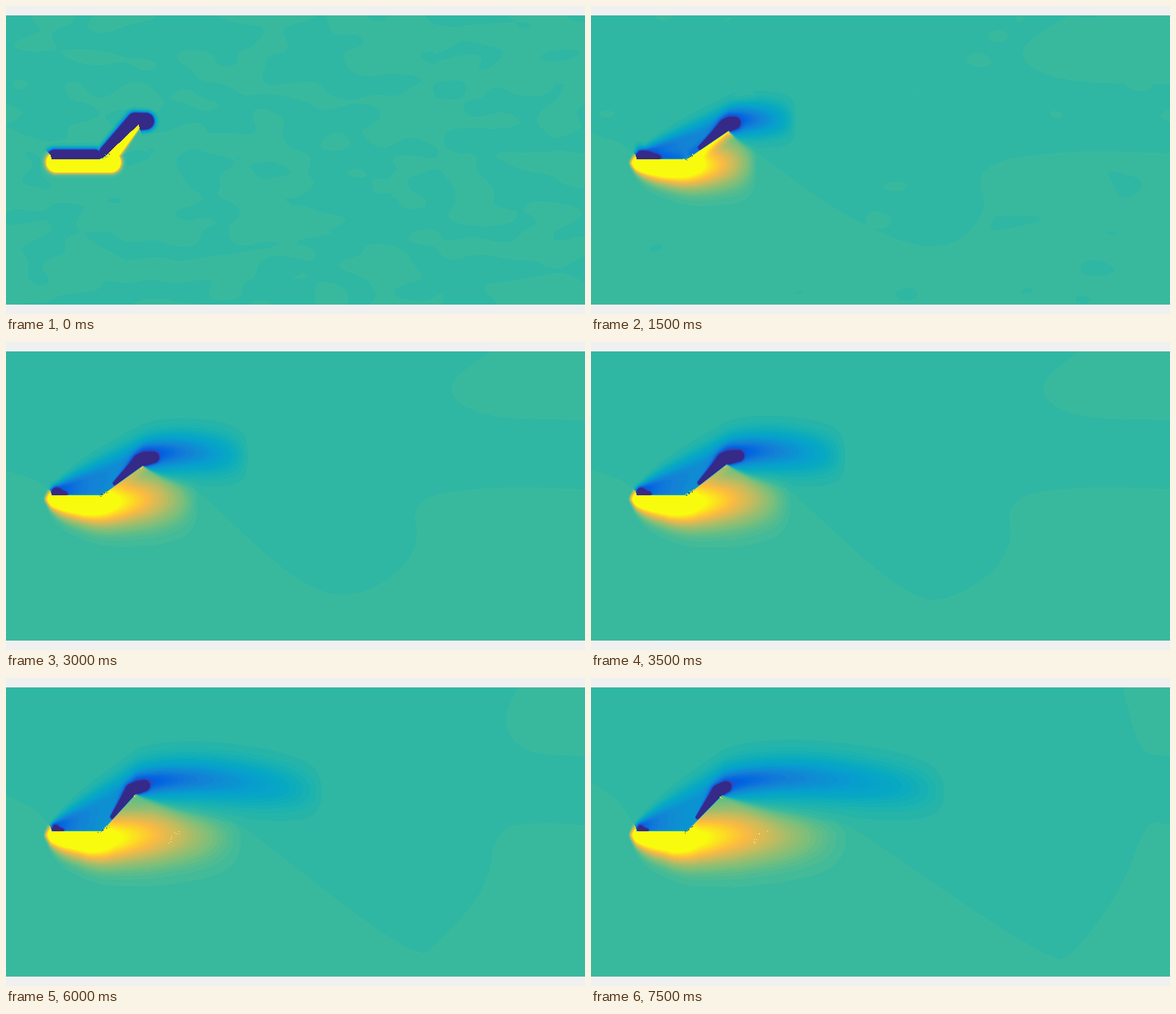
A matplotlib script that plays this animation: 802 px wide and 426 px high, repeating every 8000 ms.

```python
import numpy as np
import matplotlib.pyplot as plt
from matplotlib.animation import FuncAnimation
from matplotlib.colors import LinearSegmentedColormap
from matplotlib.path import Path

W, H, TOP, ROWS, DPI = 802, 426, 13, 400, 64
FRAMES, STEP = 16, 500

STOPS = {0: "#352a87", 4: "#3243ba", 8: "#0363e1", 15: "#1481d6", 21: "#079dcf",
         25: "#07a9c2", 29: "#1db3af", 32: "#38b99e", 38: "#7cbf7b", 45: "#c0bc60",
         52: "#f8ba44", 55: "#fec832", 63: "#f9fb0e"}
PARULA = LinearSegmentedColormap.from_list(
    "parula", [(k / 63, c) for k, c in STOPS.items()], N=64)

x = np.arange(W) + 0.5
X, Y = np.meshgrid(x, np.arange(ROWS) + TOP + 0.5)
GRID = np.column_stack([X.ravel(), Y.ravel()])

NOSE, HINGE, FLAP = np.array([62, 206]), np.array([133, 212]), 69.5


def decay(t, tau):
    return np.exp(-t / tau)


def bell(d, sigma):
    return np.exp(-0.5 * (d / sigma) ** 2)


def capsule(a, b, s0, s1):
    """Gaussian ridge along a-b whose width runs from s0 to s1."""
    d = np.subtract(b, a)
    u = np.clip(((X - a[0]) * d[0] + (Y - a[1]) * d[1]) / (d @ d), 0, 1)
    r = np.hypot(X - a[0] - u * d[0], Y - a[1] - u * d[1])
    return bell(r, s0 + (s1 - s0) * u)


def round_off(pts, passes=2):
    """Chaikin corner cutting with fixed ends."""
    for _ in range(passes):
        cut = np.stack([0.75 * pts[:-1] + 0.25 * pts[1:],
                        0.25 * pts[:-1] + 0.75 * pts[1:]], axis=1).reshape(-1, 2)
        pts = np.vstack([pts[:1], cut, pts[-1:]])
    return pts


def ripples(t, modes=40):
    """Flat, drifting patches left over from the start."""
    rng = np.random.default_rng(7)
    out = 0
    for _ in range(modes):
        kx, ky = rng.normal(0, 0.04), rng.normal(0, 0.11)
        p, q = rng.uniform(0, 2 * np.pi, 2)
        out = out + np.outer(np.cos(ky * Y[:, 0] + q), np.cos(kx * (x - 25 * t) + p))
    return out / out.std()


def pose(t):
    """Flap tip, its upper normal and the swing rate (-1 to 1)."""
    phase = 2 * np.pi * (t - 1.85) / 9
    ang = np.radians(40.8 - 7.1 * np.cos(phase) + 4.5 * decay(t, 0.6))
    tip = HINGE + FLAP * np.array([np.cos(ang), -np.sin(ang)])
    return tip, -np.array([np.sin(ang), np.cos(ang)]), np.sin(phase)


def zero_line(t, tip):
    """Boundary between both signs from the left edge to the trough."""
    left = 178 - 1.5 * (t - 2.7) ** 2
    leave = np.array([200 + 21 * t, 204])
    knee = tip + (leave - tip) * (0.4, 0.5)
    trough = (272 + 49 * t, 402 - 240 * decay(t, 2))
    return np.array([(0, left), (40, 0.55 * left + 93), NOSE, (63, HINGE[1]),
                     HINGE, tip, knee, leave, trough])


def far_field(t, line):
    """Sign of the almost still fluid around the body."""
    q = t * t
    gx = 520 + 4.4 * q
    right = np.array([line[-2], line[-1], (470 + 3.6 * q, 345 + 0.6 * q),
                      (545 + 3.4 * q, 290), (gx, 222 - 2.4 * t),
                      ((gx + W) / 2, 199), (W + 1, 204)])
    corner = np.array([(W + 1, 108), (635 + 2.3 * q, 105), (575 + 3.1 * q, 63),
                       (658 + 1.4 * q, TOP)])
    ring = np.vstack([line[:-2], round_off(right), round_off(corner), [(0, TOP)]])
    inside = Path(ring).contains_points(GRID).reshape(X.shape)
    return np.sign(np.where(inside, -1, 1) * (0.3 + 1.1 * t) + ripples(t))


def upper_layer(t, tip, up, swing):
    """Negative layer: plate, flap and the plume that leaves the tip."""
    front = 232 + 34.3 * t - 16 * decay(t, 0.4)
    s = np.clip((x - tip[0]) / (front - tip[0]), 0, 1)
    u = np.clip((x - NOSE[0]) / (tip[0] - NOSE[0]), 0, 1)
    crest_y = tip[1] - 12
    mid = np.where(x < tip[0], NOSE[1] + (crest_y - NOSE[1]) * u ** 1.3,
                   crest_y + (158 - crest_y) * s - 1.9 * t * np.sin(np.pi * s ** 0.7))
    nose = np.clip((x - 58) / 8, 0, 1)

    # wide sheet, unfaded towards the body
    sig = 23 * (1 - 0.65 * decay(t, 1.9)) * (1 - np.exp(-np.maximum(x - 55, 1) / 50))
    low = sig * (1 + 4 * np.clip((tip[0] - x) / 40, 0, 1))
    amp = nose * (0.34 * (1 - s ** 2.5) + 0.5 * np.exp(-np.abs(x - 62) / 30))
    sheet = amp * bell(Y - mid, np.where(Y < mid, sig, low))

    # narrow streak behind the tip
    streak = 0.5 * np.exp(-s / 0.3) * (s < 1) * bell(np.minimum(x - tip[0], 0), 11)
    sheet = (1.35 - 0.045 * t) * (sheet + streak * bell(Y - mid, 10 + 10 * s))

    # saturated cores on plate and flap
    wide = 4.8 + 6.5 * decay(t, 2.5)
    core = nose * capsule((70, 212), (76 + 43 * decay(t, 1.3), 212), wide, 0.55 * wide)
    root, crest = HINGE + 0.35 * (tip - HINGE) + 3 * up, tip + 8 * up
    core = np.maximum(core, capsule(root, crest, 2, 6))
    core = np.maximum(core, capsule(crest, tip + (10 + 7 * swing, -11), 6, 5))

    # even film around the body at the start
    film = np.maximum(capsule((68, 211), (122, 211), 6, 6),
                      capsule(HINGE + 0.15 * (tip - HINGE) + 3 * up, tip + 6 * up, 4.5, 6))
    film = np.maximum(film, capsule(tip + 6 * up, tip + (10, -5), 6, 5.5))
    k = decay(t, 0.4)
    return (1 - k) * np.hypot(sheet, 2 * core) + 7.5 * k * film


def lower_layer(t, tip):
    """Positive layer below the plate and its fading wake."""
    end = 205 + 21.5 * t - 33 * decay(t, 1)
    peak = 1.6 + 0.6 * decay(t, 2)
    wake = 1.05 * np.clip((end - x) / (end - 150), 0, 1) ** (0.8 + 0.08 * t)
    plate = np.minimum(peak, 1.05 + (150 - x) / 64) * np.clip((x - 52) / 10, 0, 1)
    amp = np.where(x < 150, plate, wake)
    sig = (21 - 7 * decay(t, 2.5)) * (1 + 0.3 * np.clip((x - 100) / 100, 0, 1))
    sig = sig * (1 - np.exp(-np.maximum(x - 50, 1) / 22))
    mid = 217 + 5 * bell(x - 140, 28)
    flow = np.hypot(amp * bell(Y - mid, sig),
                    1.2 * decay(t, 2.5) * capsule(HINGE, tip, 14, 7))

    film = np.maximum(capsule((70, 216), (145, 216), 5.9, 5.9),
                      capsule(HINGE, tip, 7, 1.5))
    k = decay(t, 0.4)
    return (1 - k) * flow + 15 * k * film


def speckle(v, rng, tip):
    """Stray pixels at the hinge and the flap tip."""
    def put(px, py, vals):
        v[py.astype(int) - TOP, px.astype(int)] = vals

    u = rng.uniform(0, 1, 24)
    put(130 + 13 * u + rng.normal(0, 1, 24), 213 - 8 * u + rng.normal(0, 1, 24),
        rng.choice([-1, 0.1, 1], 24))
    put(tip[0] + rng.uniform(-3, 1, 5), tip[1] + rng.uniform(1, 5, 5),
        rng.uniform(0.5, 1, 5))


def field(t, rng):
    tip, up, swing = pose(t)
    line = zero_line(t, tip)
    split = np.interp(x, line[:, 0], line[:, 1])
    soft = 0.3 + np.clip(0.1 * (x - tip[0]), 0, 8)
    below = 1 / (1 + np.exp(-np.clip((Y - split) / soft, -40, 40)))
    v = lower_layer(t, tip) * below - upper_layer(t, tip, up, swing) * (1 - below)
    v += 0.012 * far_field(t, line)
    speckle(v, rng, tip)
    return v


fig = plt.figure(figsize=(W / DPI, H / DPI), dpi=DPI, facecolor="#f0f0f0")
ax = fig.add_axes([0, (H - TOP - ROWS) / H, 1, ROWS / H])
ax.axis("off")
image = ax.imshow(np.zeros_like(X), cmap=PARULA, vmin=-1, vmax=1, aspect="auto",
                  interpolation="nearest", extent=(0, W, TOP + ROWS, TOP))
dots, = ax.plot([], [], "s", color="#fbfb9c", ms=72 / DPI, mew=0, antialiased=False)
ax.set_xlim(0, W)
ax.set_ylim(TOP + ROWS, TOP)


def update(i):
    t, rng = i * STEP / 1000, np.random.default_rng(100 + i)
    image.set_data(field(t, rng))
    # a slanted row of sparks in the late wake
    u = rng.uniform(0, 1, 8 if t >= 5 else 0)
    dots.set_data(222 + 12 * u + rng.exponential(3, u.size), 230 - 20 * u)
    return image, dots


anim = FuncAnimation(fig, update, frames=FRAMES, interval=STEP, repeat=True, repeat_delay=0)
plt.show()
```
